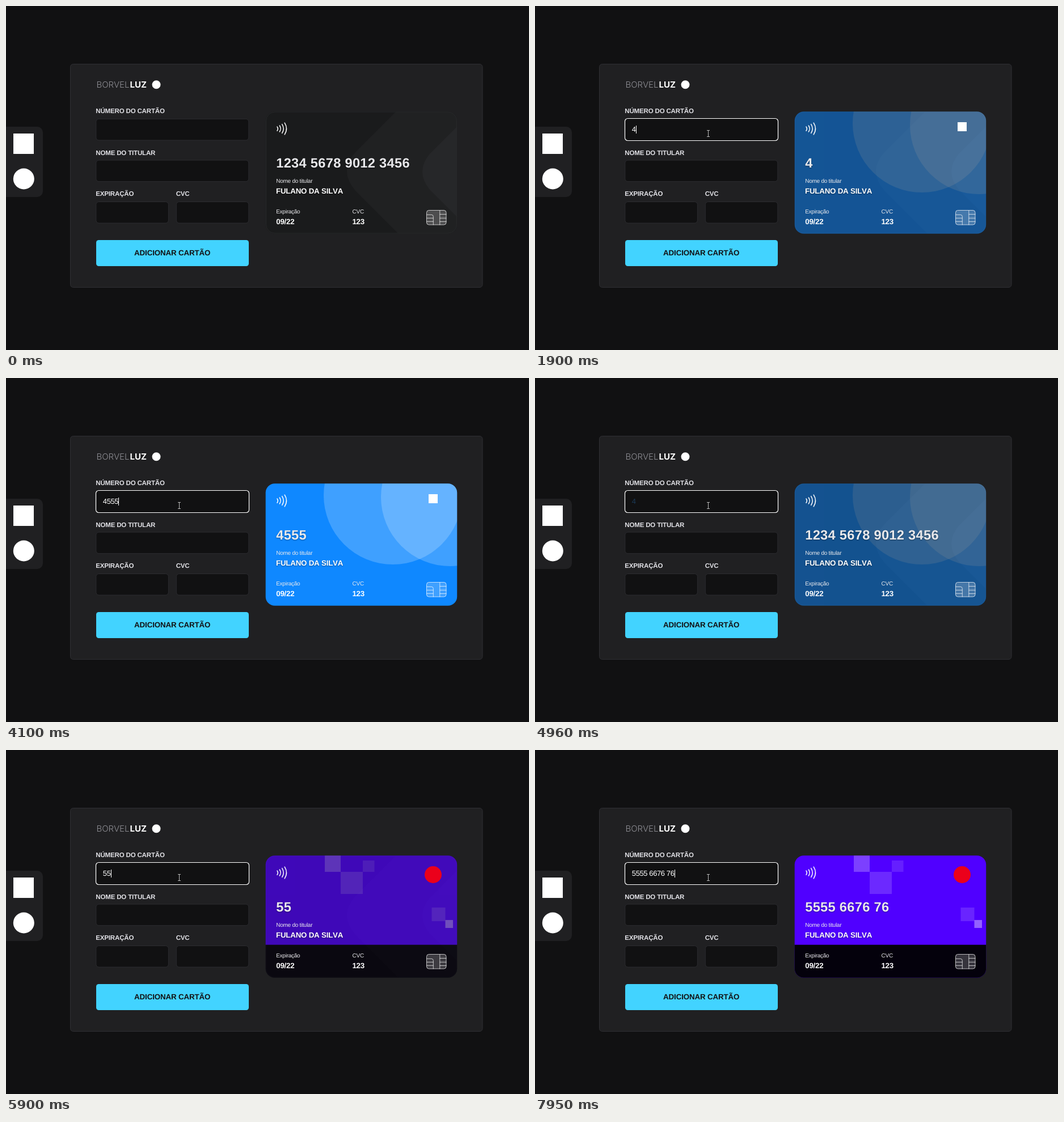
Animation, 922 px wide and 607 px high, one loop 8000 ms. Source, as an HTML page:

```html
<!DOCTYPE html>
<html lang="pt-BR">
<head>
<meta charset="utf-8">
<title>Cartão</title>
<style>
html, body { margin: 0; width: 100%; height: 100%; overflow: hidden; background: #111112; }
svg { display: block; width: 100%; height: 100%; }
text { font-family: "Liberation Sans", Arial, sans-serif; font-kerning: none; text-rendering: geometricPrecision; white-space: pre; }
.logo { font: 300 15px Inter, sans-serif; fill: #8f8f95; }
.logo.strong { font-weight: 700; fill: #fff; }
.label { font-size: 11.5px; font-weight: 700; letter-spacing: -.16px; fill: #e1e1e6; }
.field { fill: #111112; stroke: #2c2c30; }
.small { font-size: 10px; letter-spacing: -.25px; fill: #e9e9ec; }
.value { font-size: 13.3px; font-weight: 700; letter-spacing: -.2px; fill: #fff; }
.number { font-size: 23.6px; font-weight: 700; letter-spacing: .32px; fill: #e9e9ec; }
.typed { font-size: 13px; letter-spacing: -.4px; }
.shade { filter: drop-shadow(0 1px 1px rgba(0, 0, 0, .4)); }
.line { fill: none; stroke: #fff; stroke-linecap: round; }
</style>
</head>
<body>
<svg viewBox="0 0 922 607">
  <defs>
    <clipPath id="cardShape"><rect x="457.7" y="186.2" width="337.5" height="215.6" rx="16"/></clipPath>
  </defs>
  <rect width="922" height="607" fill="#111112"/>

  <!-- side links -->
  <path d="M0 213H55a10 10 0 0 1 10 10V327a10 10 0 0 1 -10 10H0z" fill="#202022"/>
  <rect x="13" y="225" width="36" height="36" fill="#fff"/>
  <circle cx="31.3" cy="305" r="18.5" fill="#fff"/>

  <!-- form -->
  <rect x="113.5" y="102.5" width="726.5" height="394" rx="5" fill="#202022" stroke="#2f2f33"/>
  <text class="logo" x="159.5" y="143.7">BORVEL</text>
  <text class="logo strong" x="218.5" y="143.7">LUZ</text>
  <circle cx="265" cy="138.7" r="7.5" fill="#fff"/>

  <text class="label" x="158.3" y="189">NÚMERO DO CARTÃO</text>
  <text class="label" x="158.3" y="262.5">NOME DO TITULAR</text>
  <text class="label" x="158.3" y="335">EXPIRAÇÃO</text>
  <text class="label" x="299.7" y="335">CVC</text>
  <rect class="field" x="158.8" y="199.3" width="269" height="37.6" rx="5"/>
  <rect class="field" x="158.8" y="272.1" width="269" height="37.6" rx="5"/>
  <rect class="field" x="158.8" y="345.5" width="127.6" height="37.6" rx="5"/>
  <rect class="field" x="300.3" y="345.5" width="127.5" height="37.6" rx="5"/>
  <rect id="ring" x="158.5" y="198.5" width="270" height="39" rx="5" fill="#111112" stroke="#fff" stroke-width="1.2"/>
  <text id="input" class="typed" x="170.8" y="221.7"></text>
  <rect id="caret" y="211" width="1" height="14" fill="#fff"/>
  <rect x="159" y="413" width="269" height="46" rx="4.5" fill="#42d3ff"/>
  <text x="293.2" y="440" text-anchor="middle" font-size="13.3" letter-spacing="-.1" font-weight="700" fill="#121214">ADICIONAR CARTÃO</text>

  <!-- card -->
  <g clip-path="url(#cardShape)">
    <rect x="457" y="186" width="339" height="217" fill="#1a1b1c"/>
    <path d="M688 186L616 258Q586 291 616 326L692 402H796V186z" fill="#202122"/>
    <path d="M796 212L747 261Q721 292 747 324L796 373z" fill="#262729"/>
    <rect x="458.5" y="187" width="336" height="214" rx="15.5" fill="none" stroke="#27282a"/>
    <g id="blue">
      <rect x="457" y="186" width="339" height="217" fill="#0f88ff"/>
      <g fill="#fff" fill-opacity=".2">
        <circle cx="682" cy="207" r="122"/>
        <circle cx="783" cy="210" r="122"/>
      </g>
    </g>
    <g id="violet">
      <rect x="457" y="186" width="339" height="217" fill="#5000ff"/>
      <rect x="457" y="343.7" width="339" height="60" fill="#04010c"/>
      <g fill="#fff">
        <rect x="562" y="186" width="28" height="29" opacity=".25"/>
        <rect x="590" y="215" width="39" height="39" opacity=".16"/>
        <rect x="629" y="195" width="20.5" height="20" opacity=".12"/>
        <rect x="750.5" y="278" width="24" height="24" opacity=".14"/>
        <rect x="774.5" y="300" width="13.5" height="14" opacity=".38"/>
      </g>
    </g>
  </g>
  <path class="line" stroke-width="1.5" d="M478 213q2.6 3.6 0 7.2M482.3 211q3.8 5.5 0 11M486.7 208.6q5 8 0 15.8M491.2 206.2q6.6 10.5 0 20.6"/>
  <rect id="blueMark" x="745" y="205" width="16" height="16" fill="#fff"/>
  <circle id="violetMark" cx="753" cy="220" r="15" fill="#eb001b"/>
  <text id="number" class="number shade" x="476.2" y="284.7"></text>
  <text class="small" x="476.2" y="312">Nome do titular</text>
  <text class="value shade" x="476" y="330.7">FULANO DA SILVA</text>
  <text class="small" x="476.2" y="366">Expiração</text>
  <text class="value" x="476.2" y="384.8">09/22</text>
  <text class="small" x="610.6" y="366">CVC</text>
  <text class="value" x="610.4" y="384.8">123</text>
  <rect x="741.5" y="360.5" width="34.5" height="25.5" rx="4" fill="#fff" fill-opacity=".2" stroke="#fff" stroke-opacity=".7"/>
  <path class="line" stroke-opacity=".7" d="M742 368.3H750q3.3 0 3.3 3.3V386M742 374.3H753M742 380.3H753M764.8 361V386M765 367.5H776M765 374.3H776M765 380.5H776"/>

  <!-- pointer -->
  <path id="arrow" d="M0 0V16.5L3.8 13L6.3 18.6L8.8 17.5L6.4 12H11.6z" fill="#fff" stroke="#000"/>
  <path id="beam" d="M-2.5 -5.5H2.5M0 -5.5V5.5M-2.5 5.5H2.5" fill="none" stroke="#b9b9b9"/>
</svg>
<script>
const LOOP = 8000, FOCUS = 1040, CLEARED = 4960;
const SAMPLE = '1234 5678 9012 3456';
const keys = [
  [0, ''], [1760, '4'], [2370, '45'], [2570, '455'], [2770, '4555'], [3040, '4555 5'],
  [3820, '4555 '], [4100, '4555'], [4230, '455'], [4360, '45'], [4630, '4'], [CLEARED, ''],
  [5570, '5'], [5830, '55'], [6110, '555'], [6340, '5555'], [6970, '5555 6'], [7070, '5555 66'],
  [7270, '5555 667'], [7420, '5555 6676'], [7510, '5555 6676 7'], [7600, '5555 6676 76'],
  [7690, '5555 6676 767'], [7950, '5555 6676 76']
];
const fields = [[158, 199, 428, 237], [158, 272, 428, 310], [158, 345, 286, 383], [300, 345, 428, 383]];

const el = {};
document.querySelectorAll('svg [id]').forEach(e => el[e.id] = e);
const show = (e, on) => e.setAttribute('visibility', on ? 'visible' : 'hidden');
const step = (t, start, size) => start + Math.floor((t - start) / size) * size;

// cubic-bezier(.25, .1, .25, 1)
function ease(x) {
  if (x <= 0) return 0;
  if (x >= 1) return 1;
  const curve = (s, a, b) => 3 * s * (1 - s) ** 2 * a + 3 * s * s * (1 - s) * b + s ** 3;
  let lo = 0, hi = 1;
  for (let i = 0; i < 24; i++) {
    const mid = (lo + hi) / 2;
    if (curve(mid, .25, .25) < x) lo = mid; else hi = mid;
  }
  return curve(lo, .1, 1);
}

function fade(t, start, lead) {
  return t < start ? 0 : ease((step(t, start, 70) - start + lead) / 450);
}

function drawPointer(t) {
  const p = Math.min(1, Math.max(0, (step(t, 260, 71) - 260) / 710));
  const k = p * p * (3 - 2 * p);
  const x = 855 + (305.5 - 855) * k, y = 592 + (225 - 592) * k;
  const inField = fields.some(([l, u, r, d]) => x > l && x < r && y > u && y < d);
  for (const e of [el.arrow, el.beam]) e.setAttribute('transform', `translate(${x} ${y})`);
  show(el.arrow, t >= 260 && !inField);
  show(el.beam, t >= 260 && inField);
}

function drawInput(t) {
  const [since, text] = keys.filter(k => k[0] <= t).pop();
  const clearing = t >= CLEARED && t < CLEARED + 70;
  let width = 0;
  for (const c of text) width += 13 * (c === ' ' ? .278 : .556) - .4;
  el.input.textContent = clearing ? '4' : text;
  el.input.setAttribute('fill', clearing ? '#1b3a58' : '#fff');
  el.number.textContent = text || SAMPLE;
  el.caret.setAttribute('x', Math.round(171 + width));
  show(el.caret, t >= FOCUS && !clearing && (t - Math.max(since, FOCUS)) % 1040 < 518);
  show(el.ring, t >= FOCUS);
}

function drawCard(t) {
  el.blue.setAttribute('opacity', t < CLEARED ? fade(t, 1830, 70) : 1 - fade(t, CLEARED, 130));
  el.violet.setAttribute('opacity', fade(t, 5830, 112));
  show(el.blueMark, t >= 1830 && t < CLEARED);
  show(el.violetMark, t >= 5830);
}

const begin = performance.now();
function draw() {
  const t = (performance.now() - begin) % LOOP;
  drawPointer(t);
  drawInput(t);
  drawCard(t);
  requestAnimationFrame(draw);
}
draw();
</script>
</body>
</html>
```
